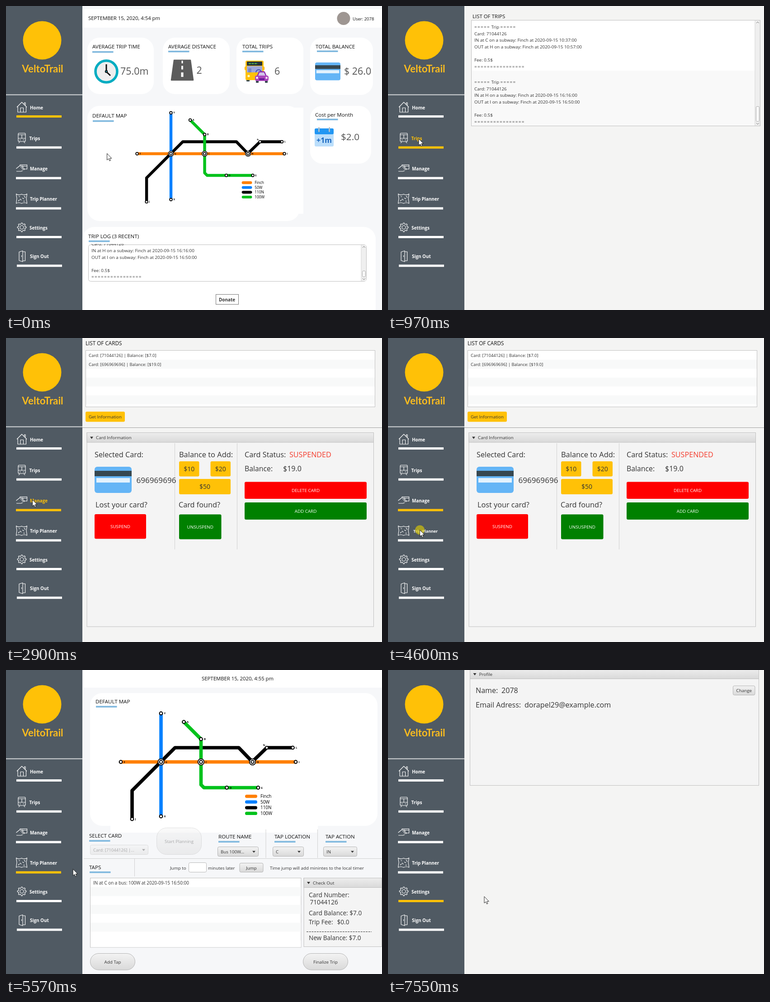
Animation, 832 px wide and 673 px high, one loop 7.58 s. Source, as an HTML page:

```html
<!DOCTYPE html>
<html lang="en">
<head>
<meta charset="utf-8">
<title>Transit dashboard</title>
<style>
html, body { margin: 0; width: 100%; height: 100%; overflow: hidden; background: #f4f4f4; }
svg { display: block; width: 100%; height: 100%; font-family: "Open Sans", "Noto Sans", sans-serif; }
</style>
</head>
<body>
<svg id="stage" viewBox="0 0 832 673"></svg>
<script>
const LOOP = 7580;
const AMBER = '#ffc107', INK = '#333', SKY = '#7fb8de';

// Markup helpers
const rect = (x, y, x2, y2, fill, r = 0, more = '') =>
  `<rect x="${x}" y="${y}" width="${x2 - x}" height="${y2 - y}" rx="${r}" fill="${fill}" ${more}/>`;
const path = (d, more) => `<path d="${d}" ${more}/>`;
const line = (d, color, width = 1, more = '') =>
  path(d, `fill="none" stroke="${color}" stroke-width="${width}" ${more}`);
const dot = (x, y, r, more) => `<circle cx="${x}" cy="${y}" r="${r}" ${more}/>`;
const text = (s, x, y, size = 9.85, fill = INK, more = '') =>
  `<text x="${x}" y="${y}" font-size="${size}" fill="${fill}" ${more}>` +
  s.replace(/=+/g, m => `<tspan letter-spacing=".138em">${m}</tspan>`) + '</text>';
const mid = (s, x, y, size = 9.8, fill = INK, more = '') =>
  text(s, x, y, size, fill, `text-anchor="middle" ${more}`);
const frame = (x, y, x2, y2, fill, r = 0, stroke = '#c0c0c0') =>
  rect(x + .5, y + .5, x2 - .5, y2 - .5, fill, r, `stroke="${stroke}"`);
const heading = (s, x, y, ux = x, uy = y + 6.5) =>
  text(s, x, y, 11.6, '#111') + rect(ux, uy, ux + 46.5, uy + 3.5, SKY);
const button = (s, x, y, x2, y2, r = 3) =>
  frame(x, y, x2, y2, 'url(#soft)', r, '#b4b4b4') + mid(s, (x + x2) / 2, (y + y2) / 2 + 4);
const block = (s, x, y, x2, y2, fill, color = '#fff', size = 9.8) =>
  rect(x, y, x2, y2, fill, 3) + mid(s, (x + x2) / 2, (y + y2) / 2 + size * .36, size, color);
const combo = (s, x, x2, y, size = 9.7) =>
  frame(x, y, x2, y + 22, 'url(#soft)', 3, '#b4b4b4') + text(s, x + 7, y + 14.5, size) +
  path(`M${x2 - 14} ${y + 9.5}h7l-3.5 4z`, `fill="${INK}"`);
const pane = (s, x, y, x2, y2, head) =>
  frame(x, y, x2, y2, '#f4f4f4') + frame(x, y, x2, head, 'url(#bar)') +
  path(`M${x + 7.5} ${head - 13}h7l-3.5 5z`, `fill="${INK}"`) + text(s, x + 20.5, head - 7.3);
const rows = (x, x2, y, count, h) =>
  Array.from({length: count}, (_, i) => i % 2 ? rect(x, y + i * h, x2, y + i * h + h, '#f8f9f9') : '').join('');
const scroller = (x, y, y2, thumb, thumb2) =>
  rect(x, y, x + 11, y2, '#efefef') + line(`M${x} ${y}V${y2}`, '#d4d4d4') +
  line(`M${x + 3} ${y + 6}l3-3 3 3M${x + 3} ${y2 - 6}l3 3 3-3`, '#777') +
  frame(x + 2, thumb, x + 10, thumb2, '#f8f8f8', 2, '#aaa');
const group = (s, more) => `<g ${more}>${s}</g>`;

const trip = (x, y, from, to, start, end, title = true) =>
  (title ? text('===== Trip =====', x, y) : '') +
  ['Card: 71044126', `IN at ${from} on a subway: Finch at 2020-09-15 ${start}:00`,
    `OUT at ${to} on a subway: Finch at 2020-09-15 ${end}:00`, '', 'Fee: 0.5$', '================']
    .map((s, i) => text(s, x, y + 14.6 * (i + 1))).join('');

const creditCard = (x, y, k) => group(
  rect(0, 0, 82, 58, '#64b5f6', 6) + rect(0, 9, 82, 21, '#37474f') + rect(4, 25, 78, 35, '#e3f2fd'),
  `transform="translate(${x} ${y}) scale(${k})"`);

function transitMap() {
  const route = (d, c) => line(d, c, 7.6, 'stroke-linejoin="round" stroke-linecap="round"');
  const stop = (name, x, y, dx = 6.5, dy = 2) =>
    dot(x, y, 3.4, 'fill="#fff" stroke="#000" stroke-width="2"') +
    text(name, x + dx, y + dy, 6, '#000', 'font-weight="700"');
  const hub = (name, x) =>
    dot(x, 203.5, 6.8, 'fill="#fff" stroke="#000" stroke-width="1.8"') +
    dot(x, 203.5, 3.4, 'fill="#fff" stroke="#000" stroke-width="2"') +
    text(name, x + 9.5, 205.7, 6, '#000', 'font-weight="700"');
  const key = [['Finch', '#ff8000'], ['50W', '#0080ff'], ['110N', '#000'], ['100W', '#00c21c']];
  return route('M254 203.5H641', '#ff8000') +
    route('M279 330V267L374 172H515L545 203 577 172H634.5', '#000') +
    route('M343 96V324', '#0080ff') +
    route('M393.5 115L431.5 153V254L438 260.5H558', '#00c21c') +
    hub('G', 343) + hub('C', 431.5) + hub('H', 545.5) +
    stop('Y', 343, 96) + stop('X', 343, 324) + stop('F', 254, 203.5) + stop('I', 641, 203.5) +
    stop('A', 393.5, 115) + stop('B', 431.5, 153) + stop('J', 279, 330) + stop('L', 634.5, 172) +
    dot(577, 172, 3.2, 'fill="#fff" stroke="#000" stroke-width="1.8"') +
    text('K', 570, 168, 6, '#000', 'font-weight="700" transform="rotate(-45 572 167)"') +
    stop('D', 488.5, 260.5) + stop('E', 558, 260.5) +
    key.map(([s, c], i) => rect(529, 276 + i * 12.6, 556, 283.2 + i * 12.6, c, 3.6) +
      text(s, 563, 283.2 + i * 12.6, 9.9, '#000')).join('');
}

function tripIcon() {
  const bus = rect(528, 134, 572, 142, '#ffb300', 2) + rect(532, 160, 539, 167, '#37474f', 1) +
    rect(530, 121, 570, 164, AMBER, 3) + rect(533, 123, 567, 132, '#263238', 1) +
    line('M537 127.5h20', '#4caf50', 2.5, 'stroke-dasharray="5 1.5"') +
    rect(533, 133, 567, 147, '#9fa8da') + rect(536, 138, 543, 147, '#7986cb', 1) +
    line('M553 147a6 6 0 0 1 12 0', '#3f51b5', 2) + dot(537, 155, 2.6, 'fill="#fff9c4"');
  const car = rect(553, 162, 559, 170, '#37474f', 1) + rect(573, 162, 579, 170, '#37474f', 1) +
    path('M555 155l4-9q.5-1.500 2-1.500h10q1.500 0 2 1.500l4 9z', 'fill="#8e24aa"') +
    path('M558 154l3-7h10l3 7z', 'fill="#d1c4e9"') + rect(551, 154, 581, 166, '#ab47bc', 4) +
    rect(560, 160, 572, 164, '#6a1b9a', 1) + dot(555.5, 159, 2.2, 'fill="#fff"') + dot(576.5, 159, 2.2, 'fill="#fff"');
  return bus + car;
}

function homePage() {
  const card = (x, y, x2, y2) => rect(x, y, x2, y2, '#fff', 27);
  const big = (s, x, y, size = 21.4) => text(s, x, y, size, '#555');
  const clock = dot(222, 145, 24, 'fill="#eeeeee" stroke="#00acc1" stroke-width="5.5"') +
    line('M222 129V145.500L231 154', '#111', 3, 'stroke-linejoin="round"') +
    dot(222, 145, 3.2, 'fill="#111"') + dot(222, 145, 1.2, 'fill="#00acc1"');
  const road = path('M372 120H408L414 164H366Z', 'fill="#5c5c5c" stroke="#5c5c5c" stroke-width="2.500" stroke-linejoin="round"') +
    path('M388.500 121h3v6h-3zM388 132.500h4v8h-4zM387.500 147h5v10h-5z', 'fill="#fff"');
  const calendar = rect(683, 271, 725, 311, '#bbdefb', 3) + rect(683, 271, 725, 284, '#2196f3', 3) +
    rect(691, 268, 694, 279, '#b0bec5', 1.5) + rect(714, 268, 717, 279, '#b0bec5', 1.5) +
    mid('+1m', 704, 303, 16, '#1565c0', 'font-weight="700"');
  return rect(169, 0, 832, 673, '#f6f7f9') + rect(169, 7, 832, 48, '#fff') +
    text('SEPTEMBER 15, 2020, 4:54 pm', 182, 31, 11.35, '#111') +
    dot(747, 27.5, 14.5, 'fill="#9e9692"') + text('User: 2078', 767, 32, 9.5, '#111') +
    card(180, 70, 327, 195) + card(347, 70, 495, 195) + card(510, 70, 658, 195) + card(673, 70, 812, 197) +
    card(180, 221, 650, 476) + rect(230, 225, 658, 460, '#fff') + card(673, 221, 808, 349) + card(169, 489, 818, 720) +
    heading('AVERAGE TRIP TIME', 191, 93.5) + heading('AVERAGE DISTANCE', 359, 93.5, 359, 99) +
    heading('TOTAL TRIPS', 523, 93.5, 523, 99) + heading('TOTAL BALANCE', 685, 93.5, 688, 98.5) +
    heading('DEFAULT MAP', 191, 247, 192, 253) + heading('Cost per Month', 684, 244.5, 688, 249.5) +
    heading('TRIP LOG (3 RECENT)', 182, 513.5, 183, 519) +
    clock + road + tripIcon() + creditCard(684, 125, .683) + calendar +
    big('75.0m', 253, 152) + big('2', 421.5, 149.5) + big('6', 594, 152) + big('$ 26.0', 748, 152) + big('$2.0', 741, 297, 20.7) +
    group(transitMap(), 'transform="translate(76.060 155.600) scale(.8424)"') +
    frame(182, 528, 798, 610, '#fff', 5) + scroller(786, 529, 609, 586, 600) +
    group(trip(189, 515.8, 'H', 'I', '16:16', '16:50', false), 'clip-path="url(#log)"') +
    frame(464, 638, 515, 661, '#fff', 0, '#777') + mid('Donate', 489, 653.5, 9.9, INK, 'font-weight="700"');
}

function tripsPage() {
  return text('LIST OF TRIPS', 187, 26.5, 11.45, '#111') + frame(184, 31, 824, 266, '#fff') +
    rect(185, 143, 812, 265, '#f9f9f9') + scroller(812, 32, 265, 222, 256) +
    trip(191, 50, 'C', 'H', '10:37', '10:57') + trip(191, 172, 'H', 'I', '16:16', '16:50');
}

function managePage() {
  const label = (s, x, y, size = 16.25, fill) => text(s, x, y, size, fill);
  return text('LIST OF CARDS', 176, 15.5, 11.7, '#111') + frame(176, 27, 817, 153, '#fff') +
    rows(177, 816, 28.5, 6, 19.7) + rect(177, 146.700, 816, 152, '#fff') +
    text('Card: [71044126] | Balance: [$7.0]', 183, 42, 9.45) +
    text('Card: [696969696] | Balance: [$19.0]', 183, 61.5, 9.45) +
    block('Get Information', 176, 163, 263, 185.500, AMBER, INK) + line('M169 198.500H832', '#a0a0a0') +
    pane('Card Information', 178.5, 209, 814, 639.500, 231.500) +
    line('M373.500 233V468M511.500 233V468', '#cfcfcf') +
    label('Selected Card:', 196, 263.5) + creditCard(196, 285, 1) + label('696969696', 288.5, 321, 17.1) +
    label('Lost your card?', 198, 374.5) + block('SUSPEND', 196, 390, 310, 444.5, '#f00') +
    label('Balance to Add:', 383, 264, 16.4) +
    block('$10', 383, 273, 427.5, 306.5, AMBER, INK, 14) + block('$20', 452.500, 273, 497, 306.5, AMBER, INK, 14) +
    block('$50', 383, 312, 497, 346, AMBER, INK, 14) +
    label('Card found?', 382, 375) + block('UNSUSPEND', 383, 390.5, 476.5, 445.5, '#008000') +
    label('Card Status:', 528, 264) + label('SUSPENDED', 627, 264, 16.15, '#f43b2c') +
    label('Balance:', 528, 295, 15.8) + label('$19.0', 613, 294.5, 16) +
    block('DELETE CARD', 528, 318.5, 798, 356, '#f00') + block('ADD CARD', 528, 364, 798, 402, '#008000');
}

function plannerPage() {
  const label = (s, x, y) => text(s, x, y, 13.6);
  return rect(169, 0, 832, 673, '#f6f7f9') + rect(172, 0, 832, 39, '#fff') +
    text('SEPTEMBER 15, 2020, 4:55 pm', 433, 22.5, 11.35, '#111') +
    rect(186, 51, 822, 345, '#fff', 27) + rect(231, 85, 690, 360, '#fff') +
    heading('DEFAULT MAP', 198, 73.5, 199, 79.5) + transitMap() +
    heading('SELECT CARD', 184, 371, 184, 376.5) +
    group(combo('Card: [71044126] |...', 186, 315, 387, 9.5) + button('Start Planning', 333, 349, 433, 409, 22), 'opacity=".4"') +
    heading('ROUTE NAME', 470, 372.5, 470, 378.5) + combo('Bus 100W...', 468, 559, 391) +
    heading('TAP LOCATION', 594, 372.5, 594, 378.5) + combo('C', 590, 659, 391) +
    heading('TAP ACTION', 707, 372.5, 707, 378.5) + combo('IN', 702, 777, 391) +
    line('M575 353V416M689.500 353V416M172 417.500H832M284.500 418V457', '#d0d0d0') +
    heading('TAPS', 184, 441, 185, 446) +
    text('Jump to', 363, 441.5, 9.8) + frame(404, 426, 444, 448, '#fff', 3, '#b8b8b8') +
    text('minutes later', 447, 441.5, 9.6) + button('Jump', 516.500, 427, 569.500, 448) +
    text('Time jump will add minintes to the local timer', 584, 441.5, 9.77) +
    frame(186, 460, 653.500, 614.500, '#fff') + rows(187, 652.500, 461, 7, 19.7) +
    rect(187, 599, 652.5, 613.5, '#fff') + text('IN at C on a bus: 100W at 2020-09-15 16:50:00', 193, 475, 9.92) +
    pane('Check Out', 658.500, 460, 832, 613, 482) +
    label('Card Number:', 670, 503) + label('71044126', 672.5, 519) + label('Card Balance: $7.0', 670, 543) +
    label('Trip Fee:', 670, 563) + label('$0.0', 732.5, 563) +
    line('M665 579.500H809', INK, 1, 'stroke-dasharray="4 1.700"') + label('New Balance: $7.0', 670, 597.5) +
    button('Add Tap', 186, 627, 286, 664.500, 18.500) + button('Finalize Trip', 657, 627, 757, 664.500, 18.500);
}

function settingsPage() {
  const label = (s, x, y) => text(s, x, y, 16.1);
  return pane('Profile', 181, -2, 821, 256, 20) + label('Name:', 194, 51) + label('2078', 251, 51) +
    label('Email Adress:', 194, 82.5) + label('dorapel29@example.com', 302, 82.5) +
    button('Change', 763, 34.500, 812.500, 56);
}

// Menu: label, label x, baseline, bar x, bar y, icon path
const gear = Array.from({length: 32}, (_, i) => {
  const a = (i - .5) * Math.PI / 16, r = i % 4 < 2 ? 9.8 : 7.4;
  return `${i ? 'L' : 'M'}${(35 + r * Math.cos(a)).toFixed(1)} ${(490 + r * Math.sin(a)).toFixed(1)}`;
}).join('') + 'Z';
const menu = [
  ['Home', 53, 228.5, 23, 242, 'M24 224L35 213 46 224M26 222.500V235H44.500V222.500M32 235V225.500H38.500V235M40.500 218V214H43V220'],
  ['Trips', 51.5, 296.5, 23, 310.700, 'M29 281.500H41Q43 281.500 43 284V298Q43 300 41 300H29Q27 300 27 298V284Q27 281.500 29 281.500ZM27 285H43M27 293H43M35 285V293M30 296.500h2.500M37.500 296.500H40M31 300L28 303.500M39 300L42 303.500'],
  ['Manage', 53, 363.5, 22, 378.5, 'M31 354V351.500H46.500V361H41M33 354.500H46M22.500 360L30 354H37Q39 355.500 36.500 357H32M36 357L40.500 360.500Q41 363 38.500 362L34.500 359.500M23 366H33L37 364.500'],
  ['Trip Planner', 53, 431, 22, 445.500, 'M22.500 416Q28 420 34.500 416.500 41 420 46.500 416L45 426 46.500 437Q41 434 34.500 437 28 434 22.500 437L24 426ZM27 432L30 429M31 427L34 430M36 425L40 427M40 421L43 424M28 422h3M38 432h4'],
  ['Settings', 52, 494.5, 23, 509, gear + 'M39 490a4 4 0 1 0-8 0a4 4 0 1 0 8 0'],
  ['Sign Out', 53, 558, 24, 572.500, 'M29 544.500L37 542V566L29 563.500ZM37 544H42.500V564H37M34.500 552v3.500']
];

document.getElementById('stage').innerHTML =
  `<defs>
    <linearGradient id="soft" x2="0" y2="1"><stop stop-color="#f3f3f3"/><stop offset="1" stop-color="#d9d9d9"/></linearGradient>
    <linearGradient id="bar" x2="0" y2="1"><stop stop-color="#ededed"/><stop offset="1" stop-color="#d9d9d9"/></linearGradient>
    <clipPath id="log"><rect x="183" y="526.500" width="602" height="83"/></clipPath>
  </defs>` + rect(0, 0, 832, 673, '#f4f4f3') +
  [homePage, tripsPage, managePage, plannerPage, settingsPage].map(page => group(page(), 'class="page"')).join('') +
  rect(0, 0, 169, 673, '#505a63') + line('M0 196.500H169', '#d3d6d8', 2) +
  dot(80, 76, 42.5, `fill="${AMBER}"`) +
  mid('VeltoTrail', 81, 147, 22.3, '#fbbc1e', 'font-weight="700" style="font-family:Lato,sans-serif"') +
  menu.map(([s, x, y, bx, by, icon]) =>
    line(icon, '#fff', 1.15, 'stroke-linejoin="round"') +
    text(s, x, y, 9.9, '#fff', 'class="label" font-weight="700"') +
    rect(bx, by, bx + 100, by + 5, '#fff', 0, 'class="bar"')).join('') +
  dot(0, 0, 10.5, 'id="halo" fill="#e2ce00"') +
  path('M0 0V14.500L3.400 11.500 5.600 16.500 7.900 15.500 5.800 10.700H10.300Z',
    'id="cursor" fill="#fff" stroke="#111" stroke-width=".9"');

const all = c => [...document.querySelectorAll(c)];
const pages = all('.page'), labels = all('.label'), bars = all('.bar');
const halo = document.getElementById('halo'), cursor = document.getElementById('cursor');
const centers = labels.map(l => { const b = l.getBBox(); return [b.x + b.width / 2, b.y + b.height / 2]; });

const pageStarts = [0, 970, 2900, 4670, 6630];
// Click: halo on, button down, button up
const clicks = [[870, 870, 970], [2830, 2830, 2900], [4600, 4600, 4670], [6500, 6530, 6630]];
// Glide: first step, last step, steps, end point, optional control point
const glides = [
  [30, 540, 18, 68, 294, 140, 206],
  [1700, 1730, 2, 70, 293],
  [2060, 2270, 8, 58.5, 358],
  [3300, 3300, 1, 59, 360],
  [4030, 4240, 8, 70.5, 425],
  [5260, 5940, 20, 82.5, 493, 225, 432],
  [7520, 7550, 2, 213, 501.5]
];

function cursorAt(t) {
  let x = 223.5, y = 326.5;
  for (const [t0, t1, n, ex, ey, cx = (x + ex) / 2, cy = (y + ey) / 2] of glides) {
    if (t < t0) break;
    const step = n > 1 ? (t1 - t0) / (n - 1) : 1;
    const p = Math.min(1, (Math.floor((t - t0) / step + 1e-6) + 1) / n);
    const s = p * p * (3 - 2 * p), q = 1 - s;
    x = q * q * x + 2 * q * s * cx + s * s * ex;
    y = q * q * y + 2 * q * s * cy + s * s * ey;
  }
  return [x, y];
}

function draw(t) {
  const current = pageStarts.filter(s => t >= s).length - 1;
  const [x, y] = cursorAt(t);
  const click = clicks.find(([on, , up]) => t >= on && t < up);
  const down = click && t >= click[1];
  pages.forEach((p, i) => p.style.display = i === current ? '' : 'none');
  bars.forEach((b, i) => b.setAttribute('fill', i === current ? AMBER : '#fff'));
  labels.forEach((l, i) => {
    const [cx, cy] = centers[i];
    const over = x > 48 && x < 116 && Math.abs(y - cy) < 16;
    l.setAttribute('fill', over && !down ? AMBER : '#fff');
    l.setAttribute('transform', over && down ? `translate(${cx} ${cy}) scale(.9) translate(${-cx} ${-cy})` : '');
  });
  halo.setAttribute('opacity', click ? (down ? .62 : .4) : 0);
  halo.setAttribute('transform', `translate(${x} ${y})`);
  cursor.setAttribute('transform', `translate(${x} ${y})`);
}

const start = performance.now();
function tick() {
  draw((performance.now() - start) % LOOP);
  requestAnimationFrame(tick);
}
tick();
</script>
</body>
</html>
```
